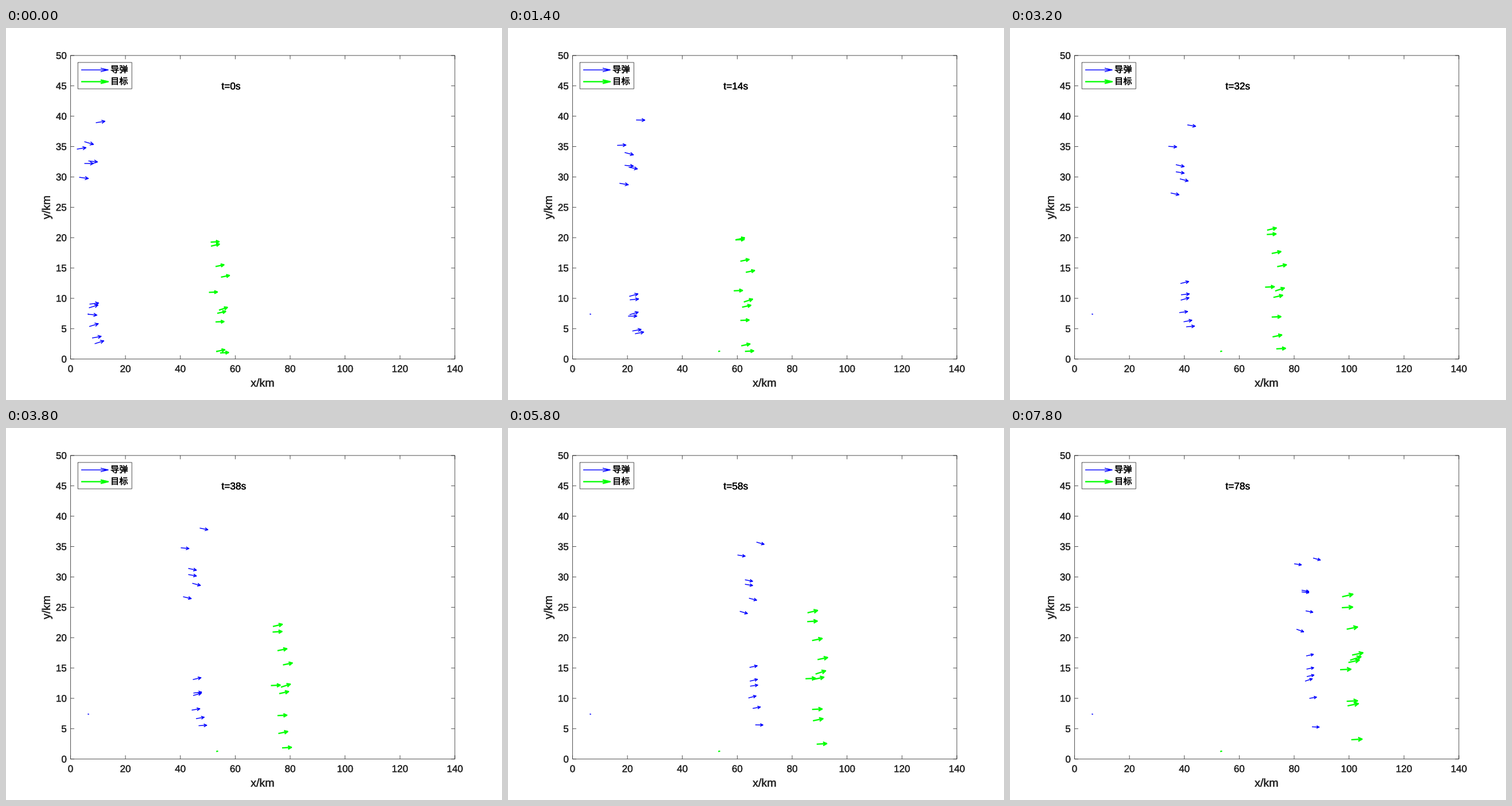
Write a matplotlib script that moves like this. It is 864 px wide and 648 px high and loops after 8 s.

```python
import numpy as np
import matplotlib.pyplot as plt
from matplotlib.animation import FuncAnimation
from matplotlib.patheffects import withStroke

W, H = 864, 648
LEFT, RIGHT, TOP, BOTTOM = 112.9, 782.4, 47.9, 576.7
BLUE, GREEN, DARK = "#0000ff", "#00ff00", "#262626"
SPAN = 78                            # seconds of flight shown
MISSILE_RUN, TARGET_RUN = 371.5, 221.5   # pixels flown in that time

plt.rcParams["font.family"] = "Liberation Sans"
fig = plt.figure(figsize=(W / 72, H / 72), dpi=72, facecolor="white")
ax = fig.add_axes([0, 0, 1, 1])
ax.set_xlim(0.5, W + 0.5)
ax.set_ylim(H, 0)
ax.axis("off")

# Launch x, y and slope, then final y and slope
MISSILES = np.array([
    (157, 165, -.16, 226.5, .28), (137, 198, .30, 282.5, .185),
    (124, 211, -.16, 236.5, .155), (144, 231.5, .12, 318.5, .19),
    (137, 236, 0, 285.5, .10), (128, 260, .14, 350.5, .36),
    (146, 481, -.12, 433, -.21), (145, 487.5, -.32, 397, -.21),
    (143, 498.5, .11, 441, -.34), (145.5, 520, -.31, 420, -.195),
    (150.5, 540, -.18, 471, -.18), (155, 550, -.32, 520.5, .045),
]).T

# Start x, y and slope, then final y
TARGETS = np.array([
    (357, 373, -.06, 313), (357.5, 380, -.25, 294),
    (365.5, 415.5, -.22, 350.5), (375, 434, -.22, 395.5),
    (354, 460.5, -.045, 421), (371.5, 491.5, -.35, 404.5),
    (368.5, 497, -.24, 408.5), (365.5, 512, -.045, 476),
    (367, 563.5, -.225, 484), (373.5, 566, -.06, 543),
]).T


def fly(t, run, x0, y0, slope0, y1, slope1):
    """Steady advance in x, smooth cubic turn in y; gives x, y and slope."""
    u = t / SPAN
    m0, m1 = slope0 * run, slope1 * run
    a, b = 2 * (y0 - y1) + m0 + m1, 3 * (y1 - y0) - 2 * m0 - m1
    y = ((a * u + b) * u + m0) * u + y0
    return x0 + run * u, y, ((3 * a * u + 2 * b) * u + m0) / run


def missiles(t):
    x, y, slope = fly(t, MISSILE_RUN, *MISSILES)
    return x, y, 15.8 - 0.042 * t, slope


def targets(t):
    """Evenly accelerated climb; the arrows keep their first heading."""
    x0, y0, slope, y1 = TARGETS
    x, y, _ = fly(t, TARGET_RUN, x0, y0, slope, y1,
                  2 * (y1 - y0) / TARGET_RUN - slope)
    return x, y, 14.6 + 0.035 * t + 0.00024 * t * t, 0.93 * slope


def arrow_points(x, y, dx, slope, back=0.36, half=0.18):
    """One broken line that holds every shaft and open head."""
    x, y, dx, slope = np.broadcast_arrays(*np.atleast_1d(x, y, dx, slope))
    dy = slope * dx
    gap = np.full(x.shape, np.nan)
    tx, ty = x + dx, y + dy
    bx, by = tx - back * dx, ty - back * dy
    px = [x, tx, gap, bx - half * dy, tx, bx + half * dy, gap]
    py = [y, ty, gap, by + half * dx, ty, by - half * dx, gap]
    return np.array(px).T.ravel(), np.array(py).T.ravel()


def line(xs, ys, color=DARK, lw=0.8, **kw):
    return ax.plot(xs, ys, color=color, lw=lw, solid_capstyle="butt", **kw)[0]


def box(x0, y0, x1, y1):
    line([x0, x1, x1, x0, x0], [y0, y0, y1, y1, y0],
         solid_joinstyle="miter", snap=False)


def label(x, y, s, size=17, color=DARK, **kw):
    heavier = [withStroke(linewidth=0.4, foreground=color)]
    return ax.text(x, y, s, fontsize=size, color=color,
                   path_effects=heavier, **kw)


# Frame, ticks and axis names
box(LEFT, TOP, RIGHT, BOTTOM)
for v in range(0, 141, 20):
    x = LEFT + (RIGHT - LEFT) * v / 140
    label(x, 599.3, str(v), ha="center")
    for edge, step in ((BOTTOM, -6.5), (TOP, 6.5)):
        line([x, x], [edge, edge + step], snap=False)
for v in range(0, 51, 5):
    y = BOTTOM + (TOP - BOTTOM) * v / 50
    label(106.3, y + 6, str(v), ha="right")
    for edge, step in ((LEFT, 6.5), (RIGHT, -6.5)):
        line([edge, edge + step], [y, y], snap=False)
label(447.5, 624.7, "x/km", 19.6, ha="center")
label(77.3, 312.3, "y/km", 19.6, ha="center", rotation=90,
      rotation_mode="anchor")

# Legend
box(125.7, 60, 219.7, 106)
for y, name, color, lw in ((73, "导弹", BLUE, 1.4), (93.5, "目标", GREEN, 2.3)):
    line(*arrow_points(131.5, y, 47, 0, back=0.28, half=0.065), color, lw)
    label(182.4, y, name, 15.3, "black", va="center",
          family="Noto Sans CJK JP")

# Stubs left at the launch points
line([142.9, 145.1], [498.3, 498.7], BLUE, 1.8)
line([366.7, 370], [563.5, 562.8], GREEN, 2.3)

blue = line([], [], BLUE, 1.45, solid_joinstyle="round")
green = line([], [], GREEN, 2.3, solid_joinstyle="round")
clock = label(375.9, 107, "", 17.3, "black")


def draw(i):
    t = 2 * i
    blue.set_data(*arrow_points(*missiles(t)))
    green.set_data(*arrow_points(*targets(t)))
    clock.set_text(f"t={t}s")
    return blue, green, clock


anim = FuncAnimation(fig, draw, frames=40, interval=200, repeat=True,
                     repeat_delay=0, init_func=lambda: draw(0))
plt.show()
```
